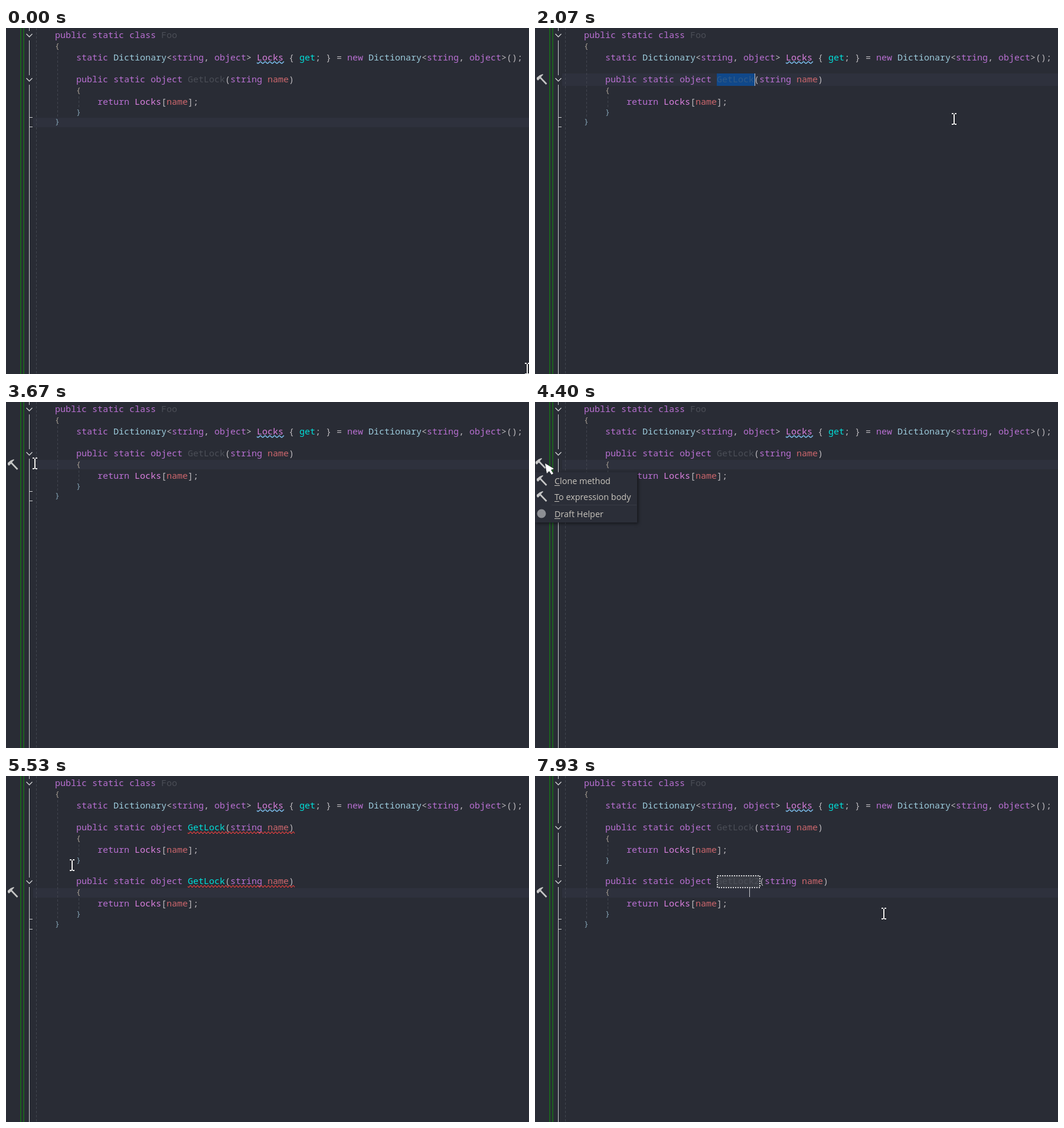
Write an HTML page with a canvas that moves like this. It is 886 by 586 pixels and loops after 8000 ms.

```html
<!DOCTYPE html>
<html lang="en">
<head>
<meta charset="utf-8">
<title>Clone method</title>
<style>
html, body { margin: 0; width: 886px; height: 586px; overflow: hidden; background: #292c35; }
canvas { display: block; }
</style>
</head>
<body>
<canvas id="stage" width="886" height="586"></canvas>
<script>
const ctx = document.getElementById('stage').getContext('2d');
const LOOP = 8000, CHAR = 9;
const BG = '#292c35', FOLD = '#cfd0d2', SELECT = '#10488a', ICON = '#c6c6c6';
const COLORS = {
  k: '#b970d2', t: '#9ccbdc', p: '#bcb9bd', l: '#dc80e0',
  g: '#00e0da', n: '#cd676d', d: '#4b4e57', s: '#315b87'
};

// Pointer path: time, x, y
const PATH = [
  [0, 882, 577], [470, 545, 315], [870, 285, 123], [1270, 268, 108],
  [1470, 268, 108], [1670, 340, 88], [1800, 340, 88], [2070, 709, 154],
  [2330, 709, 154], [2870, 273, 108], [3200, 273, 108], [3800, 17, 104],
  [4400, 17, 104], [4730, 63, 131], [5470, 63, 131], [5530, 111, 151],
  [5870, 373, 196], [6000, 373, 196], [6200, 277, 189], [6400, 277, 189],
  [6530, 335, 180], [6670, 335, 180], [6870, 746, 247], [7000, 590, 233], [8000, 590, 233]
];

function pointerAt(t) {
  const i = Math.max(1, PATH.findIndex(p => p[0] >= t));
  const [t0, x0, y0] = PATH[i - 1], [t1, x1, y1] = PATH[i];
  const u = (t - t0) / (t1 - t0), e = u * u * (3 - 2 * u);
  return [Math.round(x0 + (x1 - x0) * e), Math.round(y0 + (y1 - y0) * e)];
}

function rect(x, y, w, h, color) {
  ctx.fillStyle = color;
  ctx.fillRect(x, y, w, h);
}

function trace(points) {
  ctx.beginPath();
  points.forEach(([x, y]) => ctx.lineTo(x, y));
}

function polyline(points, color, width = 1) {
  trace(points);
  ctx.strokeStyle = color;
  ctx.lineWidth = width;
  ctx.stroke();
}

// Each token is a colour key followed by its text.
function code(x, baseline, ...tokens) {
  ctx.font = '300 15px "Noto Sans Mono", monospace';
  for (const token of tokens) {
    ctx.fillStyle = COLORS[token[0]];
    ctx.fillText(token.slice(1), x, baseline);
    x += CHAR * (token.length - 1);
  }
}

function brace(x, y, sign) {
  ctx.font = '300 13px "Noto Sans Mono", monospace';
  ctx.fillStyle = sign === '{' ? '#aaa195' : '#86a5b6';
  ctx.fillText(sign, x, y + 4);
}

function guide(x, top, bottom) {
  ctx.setLineDash([4, 3]);
  polyline([[x + .5, top], [x + .5, bottom]], '#41454f');
  ctx.setLineDash([]);
}

function squiggle(x0, x1, y, color, period, width) {
  const points = [];
  for (let x = x0; x <= x1; x++) {
    points.push([x, y + 1.5 * Math.sin((x - x0) / period * 2 * Math.PI)]);
  }
  polyline(points, color, width);
}

function caret(x, top, height) {
  rect(x, top, 1, height, '#c8c8cc');
}

function hammer(x, y) {
  polyline([[x - 2, y - 3], [x + 8.5, y + 8]], ICON, 2.6);
  trace([[-8, 0], [-8, -3], [-3, -7], [2, -9], [3, -8], [0, -5], [-1, -3], [-5, 1], [-6, 2]]
    .map(([dx, dy]) => [x + dx, y + dy]));
  ctx.fillStyle = ICON;
  ctx.fill();
}

function method(top, name, nameKey) {
  guide(123, top + 39, top + 57);
  code(119, top + 15, 'kpublic static object ', nameKey + name, 'p(', 'kstring ', 'nname', 'p)');
  brace(119, top + 29, '{');
  code(155, top + 53, 'kreturn ', 'lLocks', 'p[', 'nname', 'p];');
  brace(119, top + 66, '}');
}

function gutter(chevrons, ticks) {
  rect(24, 0, 2, 586, '#1c611f');
  rect(29, 0, 2, 586, '#1c611f');
  rect(39, 0, 1, 586, FOLD);
  for (const y of chevrons) {
    rect(34, y - 7, 11, 16, BG);
    polyline([[34.5, y - 2], [39.5, y + 3], [44.5, y - 2]], FOLD, 1.3);
  }
  for (const y of ticks) rect(39, y, 6, 1, FOLD);
}

function menu() {
  ctx.save();
  ctx.shadowColor = 'rgba(0,0,0,.5)';
  ctx.shadowBlur = 5;
  ctx.shadowOffsetX = ctx.shadowOffsetY = 2;
  rect(0, 119, 173, 85, '#2b2e38');
  ctx.restore();
  rect(28, 174, 144, 1, '#383b45');
  hammer(11, 133);
  hammer(11, 160);
  ctx.beginPath();
  ctx.arc(11, 189, 7.5, 0, 7);
  ctx.fillStyle = '#8d8f94';
  ctx.fill();
  ctx.font = '14.4px "Open Sans", sans-serif';
  ctx.fillStyle = '#c9c5bd';
  [['Clone method', 139], ['To expression body', 166], ['Draft Helper', 195]].forEach(([label, y]) => {
    ctx.fillText(label, 33, y);
    ctx.fillRect(33, y + 2, Math.round(ctx.measureText(label[0]).width), 1);
  });
}

function pointer(x, y, arrow) {
  if (arrow) {
    trace([[0, 0], [3, 17], [7, 13], [11, 19], [14, 17], [10, 11], [15, 9]]
      .map(([dx, dy]) => [x + dx, y + dy]));
    ctx.closePath();
    ctx.strokeStyle = '#1b1c20';
    ctx.lineWidth = 1;
    ctx.stroke();
    ctx.fillStyle = '#fff';
    ctx.fill();
    return;
  }
  rect(x - 1, y - 9, 4, 18, '#1e2026');
  rect(x, y - 8, 2, 17, '#f2f2f2');
  for (const edge of [y - 10, y + 8]) {
    rect(x - 3, edge, 3, 2, '#f2f2f2');
    rect(x + 2, edge, 3, 2, '#f2f2f2');
  }
}

function activeLine(t) {
  if (t < 1200) return [152, 16];
  if (t < 1800) return [98, 16];
  if (t < 3070) return [77, 21];
  if (t < 4930) return [98, 16];
  if (t < 6600) return [190, 16];
  return t < 7530 ? [168, 21] : [190, 16];
}

function draw(t) {
  const within = (a, b) => t >= a && t < b;
  const cloned = t >= 4930, renamed = t >= 7130;
  const picked = within(1800, 3200), pickedClone = within(6600, 7130);
  const errors = within(5130, 7330), resolved = within(5130, 7730);

  rect(0, 0, 886, 586, BG);
  const [top, height] = activeLine(t);
  rect(46, top, 840, height, '#2e313d');
  guide(51, 0, 586);
  guide(87, 41, cloned ? 242 : 150);

  if (picked) rect(308, 77, 64, 21, SELECT);
  if (within(6870, 7130)) rect(308, 77, 64, 21, '#ebe0f4');
  if (pickedClone) {
    rect(308, 168, 64, 21, SELECT);
    rect(372, 168, 9, 21, '#173f70');
    rect(480, 168, 9, 21, '#173f70');
  }
  if (renamed) {
    rect(308, 168, 73, 21, '#3a3d45');
    ctx.setLineDash([2, 2]);
    ctx.strokeStyle = '#d6d6d8';
    ctx.lineWidth = 2;
    ctx.strokeRect(309, 169, 72, 20);
    ctx.setLineDash([]);
  }

  code(83, 17, 'kpublic static class ', 'dFoo');
  brace(83, 31, '{');
  code(119, 55, 'kstatic ', 'tDictionary', 'p<', 'kstring', 'p, ', 'kobject', 'p> ', 'lLocks', 'p { ',
    'gget', 'p; } = ', 'knew ', 'tDictionary', 'p<', 'kstring', 'p, ', 'kobject', 'p>();');
  squiggle(425, 471, 58.5, '#79b9e6', 8, 1.5);
  const nameKey = resolved ? 'g' : 'd';
  method(77, 'GetLock', picked ? 's' : nameKey);
  if (cloned) method(168, renamed ? 'GetLock2' : 'GetLock', nameKey);
  brace(83, cloned ? 251 : 159, '}');
  if (errors) {
    squiggle(308, 489, 96, '#e0403f', 6, 1.2);
    squiggle(308, 489, 187, '#e0403f', 6, 1.2);
  }

  const settled = t >= 6600;
  const chevrons = !cloned ? [12, 87] : settled ? [12, 87, 179] : [12, 179];
  const ticks = !cloned ? [151, 167] : settled ? [151, 242, 259] : [242, 259];
  gutter(chevrons, ticks);

  if (within(1200, 1530)) caret(264, 99, 15);
  if (within(1800, 2270)) caret(372, 77, 21);
  if (within(6600, 7130)) caret(372, 168, 21);
  if (within(7130, 7530)) caret(381, 168, 21);
  if (t >= 7530) caret(363, 190, 15);

  if (within(1530, 1800)) hammer(11, 106);
  if (within(2000, 3070)) hammer(11, 87);
  if (within(3200, 3800)) hammer(11, 106);
  if (within(3800, 4800)) hammer(9, 104);
  if (within(5330, 6600)) hammer(11, 197);
  if (within(6730, 7530)) hammer(11, 178);
  if (t >= 7800) hammer(11, 197);

  const menuOpen = within(4070, 4800);
  if (menuOpen) menu();
  const [x, y] = pointerAt(t);
  pointer(x, y, menuOpen || x < 48);
}

const start = performance.now();
function tick() {
  const now = (performance.now() - start) % LOOP;
  const step = Math.floor((now + 4) * 15 / 1000) % 120;
  draw(Math.round(step * 20 / 3) * 10);
  requestAnimationFrame(tick);
}
tick();
</script>
</body>
</html>
```
